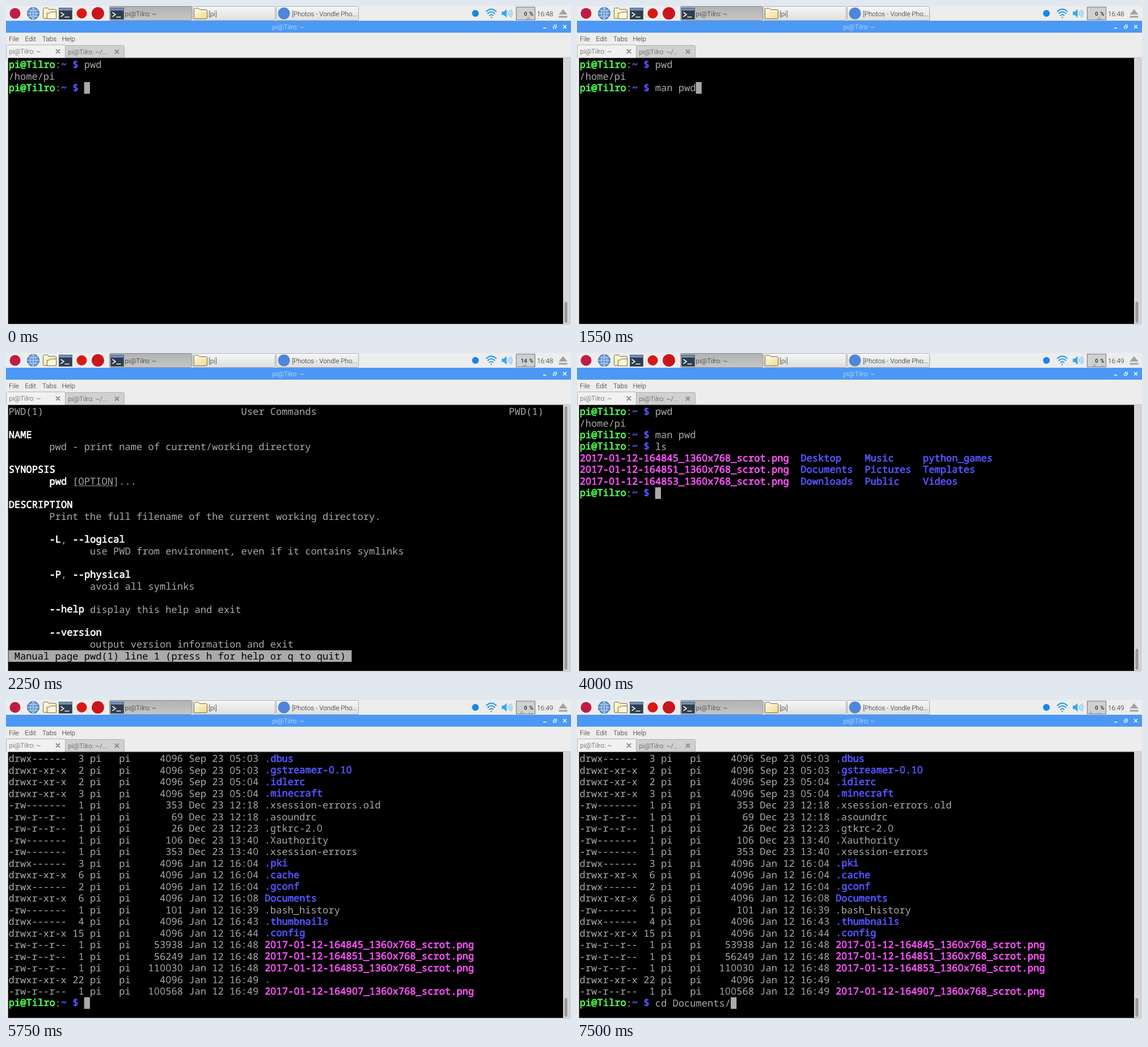
Recreate the animation shown at these times as an HTML page. Size 996x562 px, loop 8 s.

```html
<!DOCTYPE html>
<html lang="en">
<head>
<meta charset="utf-8">
<title>Terminal session</title>
<style>
  html, body { margin: 0; width: 100%; height: 100%; overflow: hidden; background: #ededed; }
  svg { display: block; width: 100vw; height: 100vh; }
  text { font: 300 11.72px Roboto, sans-serif; fill: #222; text-rendering: geometricPrecision; white-space: pre; }
  .term text { font: 400 17.09px "Noto Sans Mono", "DejaVu Sans Mono", monospace; fill: currentColor; }
  .term .zero { font-family: "Open Sans", sans-serif; }
  /* emboldened regular face: grows to the right and upwards */
  .term .bold { stroke: currentColor; stroke-width: .7px; transform: translate(.35px, -.35px); }
  .dim { fill: #444; }
  .load text { font-size: 9.5px; font-weight: 500; word-spacing: 1.6px; text-anchor: end; }
  .line { fill: none; stroke-linecap: round; }
</style>
</head>
<body>
<svg viewBox="0 0 996 562">
  <defs>
    <linearGradient id="up" x2="0" y2="1"><stop stop-color="#f7f7f7"/><stop offset="1" stop-color="#dedede"/></linearGradient>
    <linearGradient id="down" x2="0" y2="1"><stop stop-color="#b2b2b2"/><stop offset="1" stop-color="#c6c6c6"/></linearGradient>
    <linearGradient id="paper" x2="1" y2="1"><stop stop-color="#fffbe6"/><stop offset="1" stop-color="#f0d98c"/></linearGradient>
    <g id="shell">
      <rect x=".5" y=".5" width="23" height="20" fill="#2f3d4c" stroke="#59636d"/>
      <rect x="1" y="1" width="22" height="4" fill="#6c8fc4"/>
      <path class="line" d="M4 8.500l5 3.500-5 3.500M11 16.500h7" stroke="#eef2f5" stroke-width="1.600"/>
    </g>
    <g id="folder">
      <path d="M.5 17.500v-15q0-2 2-2h6l2 2.500h11q2 0 2 2v12.500q0 1.500-2 1.500h-19.500q-1.500 0-1.500-1.500z" fill="url(#paper)" stroke="#7d6c3c"/>
      <path d="M2 5.500h20" stroke="#fffdf2"/>
    </g>
    <path id="cross" class="line" d="M-3-3l6 6M3-3l-6 6" stroke-width="2"/>
  </defs>

  <rect width="996" height="562" fill="#ededed"/>

  <!-- launchers -->
  <circle cx="16" cy="13" r="9.500" fill="#c01c45"/>
  <circle cx="48" cy="13" r="10.500" fill="#5b93d3" stroke="#2c5b96"/>
  <path class="line" d="M48 2.500v21M37.500 13h21M39.500 7q8.500 3 17 0M39.500 19q8.500-3 17 0M48 2.500q-11 10.500 0 21M48 2.500q11 10.500 0 21" stroke="#dbe9f8" stroke-width=".9"/>
  <use href="#folder" x="65" y="3"/>
  <path d="M72.500 12.500h4l1.500-2h10.500v12h-16z" fill="#fdf6d8" stroke="#7d6c3c"/>
  <use href="#shell" x="93" y="3"/>
  <circle cx="133.500" cy="13" r="9" fill="#d81a12"/>
  <circle cx="162" cy="13" r="11" fill="#c9161c"/>

  <!-- task buttons -->
  <rect x="182.500" y=".5" width="145" height="25" rx="2" fill="url(#down)" stroke="#929292"/>
  <rect x="329.500" y=".5" width="145" height="25" rx="2" fill="url(#up)" stroke="#aaa"/>
  <rect x="476.500" y=".5" width="145" height="25" rx="2" fill="url(#up)" stroke="#aaa"/>
  <use href="#shell" x="184" y="3"/>
  <use href="#folder" x="331" y="3.500"/>
  <circle cx="490" cy="13" r="10.500" fill="#4f86da"/>
  <text x="209.500" y="17.500">pi@Tilro: ~</text>
  <text x="357" y="17.500">[pi]</text>
  <text x="504" y="17.500">[Photos - Vondle Pho...</text>

  <!-- tray -->
  <circle cx="827.500" cy="13" r="6" fill="#1a86ea"/>
  <g class="line" stroke="#1a9cf0" stroke-width="2">
    <path d="M847 9.500q8.500-8 17 0M849.500 13q6-5.500 12 0M852.500 16.500q3-2.500 6 0"/>
    <circle cx="855.500" cy="20" r="1.200" fill="#1a9cf0" stroke="none"/>
  </g>
  <path d="M874 10h3.500l5-4.500v15l-5-4.500h-3.500z" fill="#35a7ee"/>
  <path class="line" d="M885 10q2 3 0 6M887.500 8q3.500 5 0 10M890 6.500q4.500 6.500 0 13" stroke="#7cc6f3" stroke-width="1.400"/>
  <rect x="899.500" y="2" width="33" height="22.500" fill="#d0d0d0" stroke="#777"/>
  <path d="M974.500 15l7.500-9.500 7.500 9.500zM974.500 17.500h15v3h-15z" fill="#a2a2a2"/>

  <!-- title bar and menu -->
  <rect y="26" width="996" height="21" fill="#4c98f5"/>
  <text x="497.500" y="41" text-anchor="middle" style="fill:#e4effd">pi@Tilro: ~</text>
  <path class="line" d="M947.500 39h4.500M982.500 34l5 5M987.500 34l-5 5" stroke="#fff" stroke-width="1.500"/>
  <path class="line" d="M965 36h4v3.500h-4zM966.500 35.500v-2h4v4h-1" stroke="#fff"/>
  <g id="menu"></g>

  <!-- tabs -->
  <path d="M104.500 91v-19.500q0-2 2-2h100q2 0 2 2v19.500z" fill="#d0d0d0" stroke="#b0b0b0"/>
  <path d="M0 91h995" stroke="#b0b0b0"/>
  <path d="M.5 91.500v-21q0-2 2-2h100q2 0 2 2v21" fill="#f1f1f1" stroke="#b0b0b0"/>
  <text class="dim" x="5.500" y="84">pi@Tilro: ~</text>
  <text class="dim" x="109.500" y="85">pi@Tilro: ~/...</text>
  <use href="#cross" x="91.500" y="80" stroke="#888"/>
  <use href="#cross" x="195.500" y="80.500" stroke="#888"/>

  <!-- terminal and scrollbar -->
  <rect x="3.660" y="91.550" width="978.340" height="468.450"/>
  <rect x="982" y="91.550" width="12" height="468.450" fill="#d6d6d6"/>
  <path d="M3 560.500h991.500v-469" fill="none" stroke="#bcbcbc"/>
  <g id="scenes"></g>
</svg>
<script>
const CELL = 10.253, ROW = 20.507, LEFT = 4.4, TOP = 93, BASE = 16, LOOP = 8000;
const GREY = "#aaa";
const INK = { g: "#5f5", b: "#55f", m: "#f5f", w: "#fff", n: GREY, u: GREY, r: "#000" };

function add(parent, tag, attrs, text) {
  const node = document.createElementNS("http://www.w3.org/2000/svg", tag);
  for (const key in attrs) node.setAttribute(key, attrs[key]);
  if (text !== undefined) node.textContent = text;
  parent.append(node);
  return node;
}

// Style marks inside a line: ^g ^b ^m ^w bold colours, ^n plain, ^u underlined, ^r reversed
const PROMPT = "^gpi@Tilro^n:^b~ $^n ";
const shot = time => `^m2017-01-12-${time}_1360x768_scrot.png`;
const start = [PROMPT + "pwd", "/home/pi"];
const padded = (col, text) => " ".repeat(col) + text;

const manual = [
  "PWD(1)" + padded(34, "User Commands") + padded(33, "PWD(1)"), "",
  "^wNAME", padded(7, "pwd - print name of current/working directory"), "",
  "^wSYNOPSIS", padded(7, "^wpwd^n [^uOPTION^n]..."), "",
  "^wDESCRIPTION", padded(7, "Print the full filename of the current working directory."), "",
  padded(7, "^w-L^n, ^w--logical"),
  padded(14, "use PWD from environment, even if it contains symlinks"), "",
  padded(7, "^w-P^n, ^w--physical"), padded(14, "avoid all symlinks"), "",
  padded(7, "^w--help^n display this help and exit"), "",
  padded(7, "^w--version"), padded(14, "output version information and exit"),
  "^r Manual page pwd(1) line 1 (press h for help or q to quit) "
];

const folders = [
  "Desktop    Music     python_games",
  "Documents  Pictures  Templates",
  "Downloads  Public    Videos"
];
const short = ["164845", "164851", "164853"].map((time, i) => shot(time) + "  ^b" + folders[i]);

const DIR = "drwxr-xr-x", OWN = "drwx------", FILE = "-rw-r--r--", KEY = "-rw-------";
const long = [
  [OWN, 3, 4096, "Sep 23 05:03", "^b.dbus"],
  [DIR, 2, 4096, "Sep 23 05:03", "^b.gstreamer-0.10"],
  [DIR, 2, 4096, "Sep 23 05:04", "^b.idlerc"],
  [DIR, 3, 4096, "Sep 23 05:04", "^b.minecraft"],
  [KEY, 1, 353, "Dec 23 12:18", ".xsession-errors.old"],
  [FILE, 1, 69, "Dec 23 12:18", ".asoundrc"],
  [FILE, 1, 26, "Dec 23 12:23", ".gtkrc-2.0"],
  [KEY, 1, 106, "Dec 23 13:40", ".Xauthority"],
  [KEY, 1, 353, "Dec 23 13:40", ".xsession-errors"],
  [OWN, 3, 4096, "Jan 12 16:04", "^b.pki"],
  [DIR, 6, 4096, "Jan 12 16:04", "^b.cache"],
  [OWN, 2, 4096, "Jan 12 16:04", "^b.gconf"],
  [DIR, 6, 4096, "Jan 12 16:08", "^bDocuments"],
  [KEY, 1, 101, "Jan 12 16:39", ".bash_history"],
  [OWN, 4, 4096, "Jan 12 16:43", "^b.thumbnails"],
  [DIR, 15, 4096, "Jan 12 16:44", "^b.config"],
  [FILE, 1, 53938, "Jan 12 16:48", shot("164845")],
  [FILE, 1, 56249, "Jan 12 16:48", shot("164851")],
  [FILE, 1, 110030, "Jan 12 16:48", shot("164853")],
  [DIR, 22, 4096, "Jan 12 16:49", "^b."],
  [FILE, 1, 100568, "Jan 12 16:49", shot("164907")]
].map(([mode, links, size, date, name]) =>
  `${mode}${String(links).padStart(3)} pi   pi${String(size).padStart(9)} ${date} ${name}`);

// graph: pairs of x and height inside the load meter
const scenes = [
  { at: 0, lines: [...start, PROMPT], clock: "16:48", load: 0, thumb: 521, graph: [[917, 2], [919, 4], [921, 5], [923, 3]] },
  { at: 500, lines: [...start, PROMPT + "man pwd"], clock: "16:48", load: 0, thumb: 521, graph: [[917, 2], [919, 4], [921, 5], [923, 3]] },
  { at: 2250, lines: manual, clock: "16:48", load: 14, thumb: 94, graph: [[911, 2], [913, 4], [915, 5], [917, 3], [930, 3]], pager: true },
  { at: 4000, lines: [...start, PROMPT + "man pwd", PROMPT + "ls", ...short, PROMPT], clock: "16:49", load: 0, thumb: 521, graph: [[910, 4], [912, 5], [914, 2], [925, 3], [928, 2]] },
  { at: 5750, lines: [...long, PROMPT], clock: "16:49", load: 0, thumb: 525, graph: [[907, 3], [909, 5], [911, 2], [922, 3], [926, 2]] },
  { at: 7500, lines: [...long, PROMPT + "cd Documents/"], clock: "16:49", load: 0, thumb: 525, graph: [[903, 3], [905, 5], [907, 2], [918, 3], [922, 2]] }
];

function block(parent, col, row, count) {
  add(parent, "rect", { x: LEFT + col * CELL, y: TOP + row * ROW, width: count * CELL, height: ROW, fill: GREY });
}

// Draws one line word by word on the cell grid and returns its length
function drawLine(parent, line, row) {
  const y = TOP + row * ROW + BASE;
  let col = 0;
  for (const part of line.split(/(?=\^\w)/)) {
    const marked = part[0] === "^";
    const style = marked ? part[1] : "n";
    const run = marked ? part.slice(2) : part;
    if (style === "r") block(parent, col, row, run.length);
    const text = add(parent, "text", { y, style: "color:" + INK[style] });
    if ("gbmw".includes(style)) text.classList.add("bold");
    for (const word of run.matchAll(/0|[^0 ]+/g)) {
      const zero = word[0] === "0";
      const x = LEFT + (col + word.index) * CELL + (zero ? 0.24 : 0);
      add(text, "tspan", zero ? { x, class: "zero" } : { x }, word[0]);
    }
    if (style === "u") {
      add(parent, "rect", { x: LEFT + col * CELL, y: y + 1.5, width: run.length * CELL, height: 1, fill: GREY });
    }
    col += run.length;
  }
  return col;
}

function build(scene) {
  const group = add(document.getElementById("scenes"), "g", { display: "none" });
  const term = add(group, "g", { class: "term" });
  let end = 0;
  scene.lines.forEach((line, row) => { end = drawLine(term, line, row); });
  if (!scene.pager) block(term, end, scene.lines.length - 1, 1);

  add(group, "rect", { x: 984.5, y: scene.thumb, width: 5, height: 558 - scene.thumb, rx: 2.5, fill: "#999" });
  add(group, "text", { x: 936, y: 17.5 }, scene.clock);
  const meter = add(group, "g", { class: "load" });
  for (const [x, h] of scene.graph) {
    add(meter, "rect", { x, y: 24 - h, width: 1, height: h, fill: "#999" });
  }
  add(meter, "text", { x: 929.5, y: 17 }, scene.load + " %");
  return group;
}

[["File", 5], ["Edit", 33.5], ["Tabs", 64], ["Help", 98.5]].forEach(([label, x]) =>
  add(document.getElementById("menu"), "text", { x, y: 61.5 }, label));

const groups = scenes.map(build);
const began = performance.now();
let shown = -1;

function show(now) {
  const t = Math.max(0, now - began) % LOOP;
  const index = scenes.filter(scene => scene.at <= t).length - 1;
  if (index !== shown) {
    groups.forEach((group, i) => group.setAttribute("display", i === index ? "inline" : "none"));
    shown = index;
  }
}

function tick(now) {
  show(now);
  requestAnimationFrame(tick);
}

show(began);
requestAnimationFrame(tick);
</script>
</body>
</html>
```
